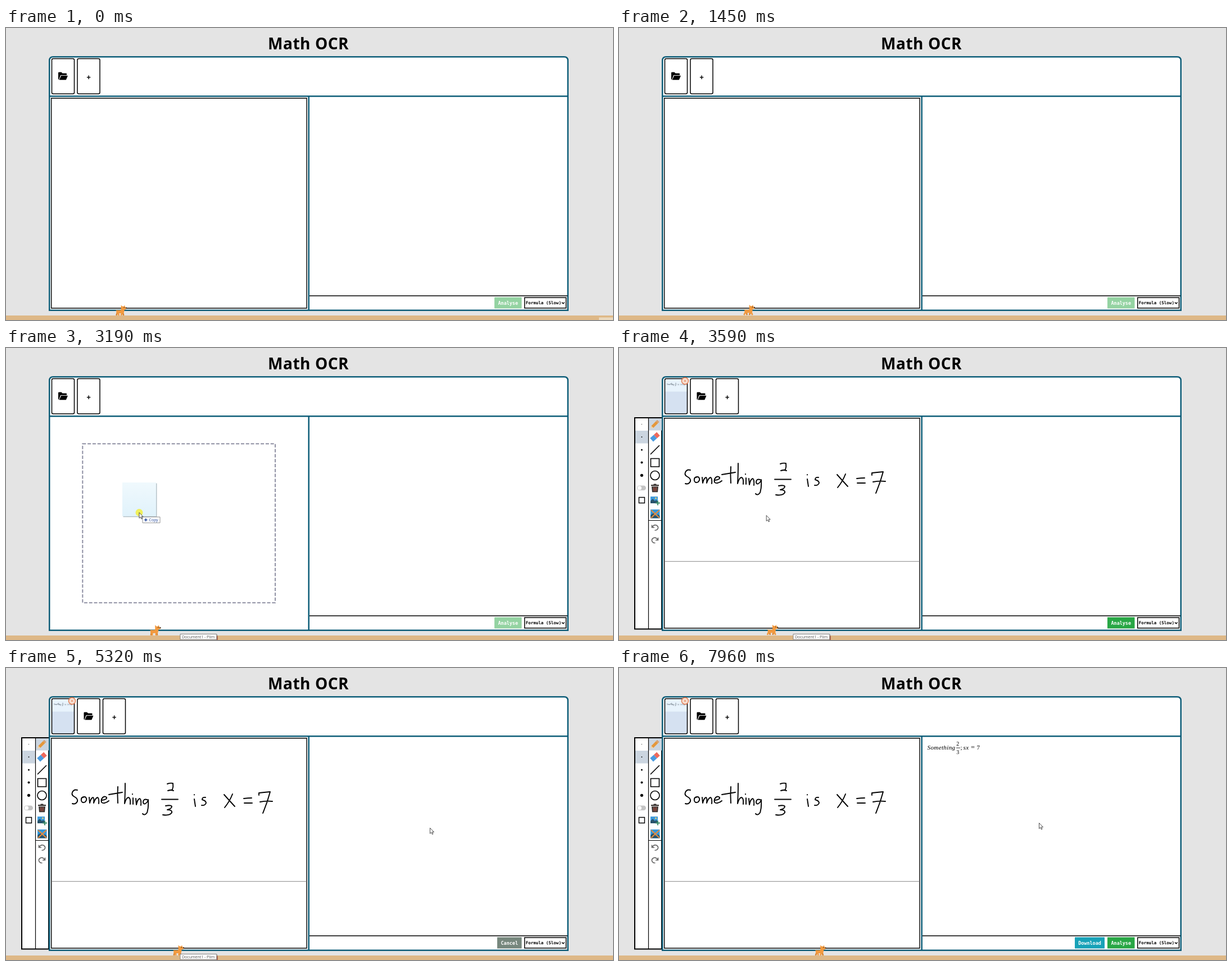
Write an HTML page that moves like this. It is 1080 by 519 pixels and loops after 8 s.

```html
<!DOCTYPE html>
<html lang="en">
<head>
<meta charset="utf-8">
<title>Math OCR</title>
<style>
html, body { margin: 0; width: 100%; height: 100%; overflow: hidden; background: #e4e4e4; }
svg { display: block; width: 100%; height: 100%; }
.title { font: bold 28px "Open Sans", "Noto Sans", sans-serif; letter-spacing: .55px; }
.mono { font: bold 8.45px "DejaVu Sans Mono", monospace; text-anchor: middle; fill: #fff; }
.ui { font: 7px "Open Sans", "Noto Sans", sans-serif; }
.math { font: 11.2px "Liberation Serif", serif; }
.it { font-style: italic; letter-spacing: .3px; }
.line { fill: none; stroke: #000; }
.card { fill: #fff; stroke: #000; stroke-width: 1.5; }
.teal { fill: none; stroke: #0d5d78; stroke-width: 2.5; }
</style>
</head>
<body>
<svg viewBox="0 0 1080 519">
<defs>
  <linearGradient id="sheet" x2="0" y2="1">
    <stop offset="0" stop-color="#f0f9fd"/><stop offset="1" stop-color="#e0f2fb"/>
  </linearGradient>
  <g id="ink" fill="none" stroke-linecap="round" stroke-linejoin="round">
    <path d="M127 217q-6-2-9 4q-2 5 4 8q6 3 5 8q-3 6-9 4"/>
    <path d="M138 229q-5 1-4 7q2 5 7 2q4-4 1-8q-2-2-5 0"/>
    <path d="M148 230l1 10q2-9 6-10q2 1 1 10q3-9 7-10q3 2 2 11"/>
    <path d="M170 235q10-1 9-5q-5-4-9 3q-2 8 5 7q5-1 8-4"/>
    <path d="M199 211q-1 15 0 29M183 225q12-2 24-4"/>
    <path d="M212 205q0 20-1 36q3-11 7-11q4 1 3 12"/>
    <path d="M226 231v11M225 224v.5M231 232l1 11q2-10 6-11q3 2 2 12"/>
    <path d="M251 234q-7-2-7 5q2 6 8-2l1-3q1 14-2 23q-4 6-8 2"/>
    <path d="M287 206q5-2 10-1q1 6-1 11q-4 2-8 2q5-2 10 0M277 233.500h29"/>
    <path d="M284 245q9-2 11 1q0 4-8 6q9 0 8 5q-4 6-16 4"/>
    <path d="M335 233l2 13M335 225v.5M355 230q-6-1-6 4q7 2 7 6q-2 5-8 4"/>
    <path d="M388 225q8 9 19 21M403 224q-5 13-14 24M423 232q8-1 14-1M424 240h14"/>
    <path d="M450 226v-4q9-1 20-2q-5 19-13 38M452 238q11-2 22-1"/>
  </g>
  <path id="folder" d="M0 1.200q0-1.200 1.200-1.200h4.300l2 2h6.500q1 0 1 1v2.200h-10q-1 0-1.400 1l-2.200 6.200V13.200H1.200Q0 13.200 0 12zM5 6.300h12l-3.200 7.500h-12z"/>
  <path id="arrow" d="M0 0v10l2.300-2.100 1.600 3.500 1.600-.7-1.600-3.400h3.100z" fill="#fff" stroke="#222" stroke-width=".8"/>
</defs>

<rect width="1080" height="519" fill="#e4e4e4"/>
<text class="title" x="466" y="38">Math OCR</text>

<g id="tools">
  <path d="M28 124h48v375.500H28z" fill="#fff" stroke="#000" stroke-width="2"/>
  <path d="M29 147h23v22.500H29zM53 125h23v21.500H53z" fill="#cbd5e0"/>
  <path class="line" d="M52.500 124v376M52 306.500h24" stroke-width="1.200"/>
  <g id="dots"></g>
  <rect x="32" y="244.500" width="16" height="8.500" rx="4.250" fill="#c4c4c4"/>
  <circle cx="36.500" cy="248.750" r="3.600" fill="#fff"/>
  <path class="line" d="M35.500 265.500h10v10h-10z" stroke-width="1.400"/>
  <g transform="translate(63.500 136) rotate(-45)">
    <path d="M-6 -2.600h12v5.200h-12z" fill="#e5973a"/>
    <path d="M6 -2.600h3v5.200h-3z" fill="#d8a070"/>
    <path d="M-6 -2.600v5.200l-4-2.600z" fill="#f3d2a2"/>
  </g>
  <g transform="translate(64 158) rotate(-42)">
    <path d="M-8 -4.200h9v8.400h-9z" fill="#4a9be0"/>
    <path d="M1 -4.200h7v8.400h-7z" fill="#ee6a5c"/>
  </g>
  <path class="line" d="M56 189l16-16M56.500 196.500h15v14.500h-15z" stroke-width="1.600"/>
  <circle class="line" cx="64" cy="226.500" r="8" stroke-width="1.600"/>
  <path d="M57 243h14v2.200H57zM61.500 241.500h5v1.500h-5zM58 246.200h12l-1 10h-10z" fill="#3a3533"/>
  <path d="M61.500 247.500l.4 7M64 247.500v7M66.500 247.500l-.4 7" stroke="#c5584a"/>
  <path d="M56 264h13v12H56z" fill="#3f9bdc"/>
  <path d="M56 276v-4l4-4 4 4 2-2 3 3v3z" fill="#28536b"/>
  <circle cx="65.500" cy="267" r="1.400" fill="#f6d66a"/>
  <path d="M69 271.500v8M65 275.500h8" stroke="#3d8c6a" stroke-width="2"/>
  <path d="M56 287h16.500v15.500H56z" fill="#3498db"/>
  <path d="M56 302.500v-5l5-4 5 5 3-3 3.500 3v4z" fill="#28536b"/>
  <path d="M57 288l15 14M72 288l-15 14" stroke="#e58a3c" stroke-width="2"/>
  <path id="undo" d="M58.500 314.500v4.500h4.500M59 318.500q3-5 7.500-3.500q4.500 2.500 2.500 6.500q-2 3-5.500 2.500" fill="none" stroke="#666" stroke-width="1.600"/>
  <use href="#undo" transform="translate(128 22.500) scale(-1 1)"/>
</g>

<path d="M77.250 501.750V58q0-6.750 6.750-6.750H993q6.750 0 6.750 6.750v443.750z" class="teal" style="fill:#fff"/>
<path class="teal" d="M77 121.200h923M538.700 121v380"/>
<path class="line" d="M540 476h459" stroke-width="1.400"/>

<g id="thumb">
  <rect x="81.500" y="54.500" width="40" height="62.500" rx="2.500" fill="#d5e1f1"/>
  <path d="M82 55h39v22.500H82z" fill="#e8f3fc"/>
  <use href="#ink" transform="translate(74.700 43.700) scale(.09)" stroke="#65717c" stroke-width="5"/>
  <rect x="81.500" y="54.500" width="40" height="62.500" rx="2.500" class="line" stroke-width="1.500"/>
  <circle cx="117.500" cy="58.500" r="6" fill="#f7e4d8" stroke="#df6a3c" stroke-width="1.300"/>
  <path d="M115.500 56.500l4 4M119.500 56.500l-4 4" stroke="#df6a3c"/>
</g>
<g id="buttons">
  <rect class="card" x="81.500" y="54.500" width="40" height="62.500" rx="2.500"/>
  <rect class="card" x="127" y="54.500" width="40" height="62.500" rx="2.500"/>
  <use href="#folder" x="93" y="78.500"/>
  <text class="mono" x="147" y="91.500" style="fill:#000;font-size:12px">+</text>
</g>

<path id="board" class="line" d="M80.700 124.800h454.300v373.200H80.700z" stroke-width="1.400"/>
<path id="zone" d="M136.300 170.300h342.700v282.400H136.300z" fill="none" stroke="#8f90a3" stroke-width="2" stroke-dasharray="6 2.800"/>
<g id="photo">
  <use href="#ink" stroke="#000" stroke-width="1.900"/>
  <path d="M81.500 379.300h453" stroke="#888"/>
</g>

<g id="result" class="math">
  <text class="it" x="548.500" y="145.300">Something</text>
  <text x="600.300" y="138.300" font-size="10">2</text>
  <text x="600.300" y="152.600" font-size="10">3</text>
  <path d="M600 142h7" stroke="#000" stroke-width=".8"/>
  <text x="607.500" y="145.300">;</text>
  <text class="it" x="612.500" y="145.300">sx</text>
  <text x="626" y="145.300" style="font-size:12.500px">=</text>
  <text x="636.500" y="145.300">7</text>
</g>
<g id="download">
  <path d="M811 478.500h53v20h-53z" fill="#17a2b8"/>
  <text class="mono" x="837.500" y="491.800">Download</text>
</g>
<path id="action"/>
<text id="label" class="mono" y="491.800"></text>
<rect class="card" x="922.700" y="479.200" width="73.800" height="18.600"/>
<text class="mono" x="956.300" y="491.300" style="fill:#000;font-size:7.500px">Formula (Slow)</text>
<path class="line" d="M989 487.500l2.300 2.500 2.300-2.500" stroke-width="1.400"/>

<path d="M0 511h1080v8H0z" fill="#deb887"/>
<path id="corner" d="M1055 514.500h25v4.500h-25z" fill="#ead9bf"/>

<g id="dog">
  <path id="farLegs" fill="none" stroke="#d9822b" stroke-width="2.600"/>
  <path id="nearLegs" fill="none" stroke="#f29a3f" stroke-width="2.800"/>
  <path d="M0 8.500l2 1h7l1-2.500-.3-3.500L10 .5l2 2.300h3l1.200-2.300 1 3.200 2.300 1.500v2l-3.500 1.200-1 5.600-2 1.500-5-.5-4.500 1-2-1.500v-4z" fill="#f29a3f"/>
  <path d="M18 4.400h2v2h-2zM14.800 4h1.300v1.300h-1.300z" fill="#3a2a20"/>
</g>

<g id="tip">
  <path d="M375 512h1.800v7H375z" fill="#cc6a55"/>
  <path d="M311.500 509.500h65v9.500h-65z" fill="#000" opacity=".2"/>
  <path d="M310 508.500h64.800v9.700H310z" fill="#fff" stroke="#777" stroke-width=".9"/>
  <text class="ui" x="313" y="516" fill="#555">Document1 - Plim</text>
</g>

<g id="pointer">
  <g id="drag">
    <path d="M-28.500 -52h60v60h-60z" fill="#8fa3ad" opacity=".65"/>
    <path d="M-30 -53.500h60v60h-60z" fill="url(#sheet)"/>
  </g>
  <circle id="press" r="6.500" fill="#f2ee3f" opacity=".85"/>
  <g id="copy">
    <path d="M6 7.800h31v10.500H6z" fill="#fff" stroke="#888" stroke-width=".9"/>
    <path d="M9 13h5.500M11.750 10.250v5.500" stroke="#24479b" stroke-width="1.500"/>
    <text class="ui" x="17.300" y="15.700" fill="#24479b">Copy</text>
  </g>
  <use href="#arrow"/>
</g>
</svg>

<script>
const LOOP = 8000, STEP = 66.9;
const ENTER = 2500, HOVER = 2640, DROP = 3250, CLICK = 4780, DONE = 7180;
const $ = id => document.getElementById(id);
const show = (id, on) => $(id).setAttribute('display', on ? 'inline' : 'none');
const clamp = v => Math.min(1, Math.max(0, v));
const ramp = (t, a, b) => clamp((t - a) / (b - a));
const smooth = u => u * u * (3 - 2 * u);

$('dots').innerHTML = [.6, .9, 1.5, 2, 2.6]
  .map((r, i) => `<circle cx="40.500" cy="${135.5 + i * 22.7}" r="${r}"/>`).join('');

// time, x, y of the pointer tip
const route = [
  [2500, 86, 303.5], [2580, 88, 303], [3000, 237, 292.5], [3450, 237, 292.5],
  [4230, 845, 414], [4320, 846, 415], [4680, 890, 486], [4900, 890, 486],
  [5120, 822, 367], [5320, 748.5, 277], [5700, 747.5, 275.5], [8000, 747.5, 275.5]
];

function pointerAt(t) {
  let i = 1;
  while (i < route.length - 1 && t > route[i][0]) i++;
  const [a, b] = [route[i - 1], route[i]];
  const u = smooth(ramp(t, a[0], b[0]));
  return [a[1] + (b[1] - a[1]) * u, a[2] + (b[2] - a[2]) * u];
}

const BUTTONS = {
  off: ['Analyse', 869, '#94d3a2'],
  ready: ['Analyse', 869, '#28a745'],
  busy: ['Cancel', 874, '#76877d']
};

function setAction(state) {
  const [text, x, color] = BUTTONS[state];
  $('action').setAttribute('d', `M${x} 478.500H917.500v20H${x}z`);
  $('action').setAttribute('fill', color);
  $('label').textContent = text;
  $('label').setAttribute('x', (x + 917.5) / 2);
}

function drawDog(t) {
  const phase = t / 530 * 2 * Math.PI;
  const swing = 3.2 * Math.sin(phase + .9);
  const bob = .5 * Math.cos(phase * 2);
  $('dog').setAttribute('transform', `translate(${194.8 + t * .0193} ${491.5 + bob})`);
  const legs = s => `M4 12L${3.5 + s} 18.800M12.500 12L${12.5 - s} 18.800`;
  $('nearLegs').setAttribute('d', legs(swing));
  $('farLegs').setAttribute('d', legs(-swing * .8));
}

function draw(time) {
  const t = Math.floor((time + 1) / STEP) * STEP;
  const loaded = t >= DROP, done = t >= DONE;
  const dragging = t >= ENTER && !loaded;
  const hover = t >= HOVER && !loaded;

  for (const id of ['tools', 'thumb', 'photo']) show(id, loaded);
  $('buttons').setAttribute('transform', `translate(${loaded ? 45.5 : 0} 0)`);
  show('board', !hover);
  show('zone', hover);
  show('result', done);
  show('download', done);
  setAction(!loaded ? 'off' : t >= CLICK && !done ? 'busy' : 'ready');

  $('corner').setAttribute('opacity', 1 - ramp(t, 100, 350));
  $('tip').setAttribute('opacity', ramp(t, 1410, 1600) * (1 - ramp(t, 6500, 6680)));
  drawDog(t);

  const [x, y] = pointerAt(t);
  show('pointer', t >= ENTER);
  $('pointer').setAttribute('transform', `translate(${x} ${y})`);
  show('drag', dragging);
  show('copy', hover);
  show('press', t >= ENTER && t < 3420 || t >= 4700 && t < 4850);
}

function frame(now) {
  draw(now % LOOP);
  requestAnimationFrame(frame);
}
draw(0);
requestAnimationFrame(frame);
</script>
</body>
</html>
```
